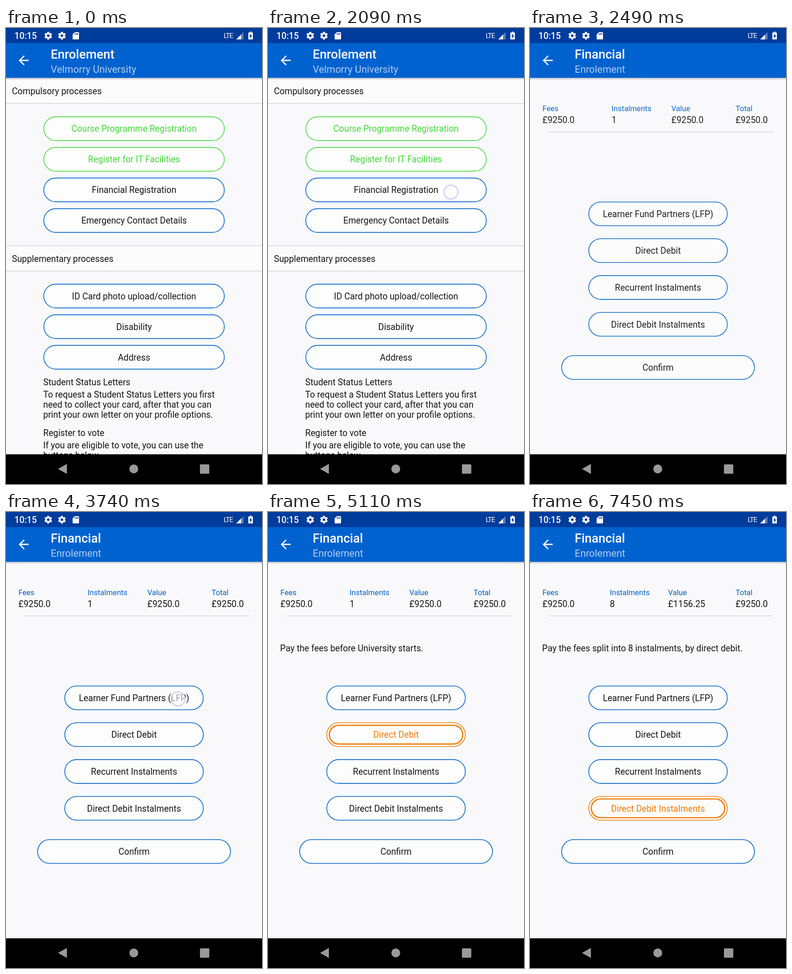
An HTML page that plays this animation: 561x998 px, repeating every 8 s.

```html
<!DOCTYPE html>
<html lang="en">
<head>
<meta charset="utf-8">
<title>Enrolement</title>
<style>
  html, body { margin: 0; height: 100%; overflow: hidden; background: #000; }
  svg { display: block; width: 100%; height: 100%; }
  text { font: 19.3px Roboto, sans-serif; fill: #171717; white-space: pre; }
  .label { font-size: 16.6px; fill: #0060c2; }
  .title { font-size: 27.3px; font-weight: 500; fill: #fff; }
  .subtitle { font-size: 21.8px; fill: #b0cdf0; }
  .clock { font-weight: 500; fill: #fff; }
  .network { font-size: 15px; letter-spacing: -1.2px; fill: #fff; }
</style>
</head>
<body>
<svg viewBox="0 0 561 998">
  <defs>
    <linearGradient id="shade" x2="0" y2="1">
      <stop stop-color="#000" stop-opacity=".24"/>
      <stop offset="1" stop-color="#000" stop-opacity="0"/>
    </linearGradient>
    <clipPath id="page"><rect y="109" width="561" height="824"/></clipPath>
  </defs>
  <rect width="561" height="998" fill="#000"/>
  <rect y="109" width="561" height="824" fill="#f9f9fb"/>
  <g clip-path="url(#page)">
    <g id="processes"></g>
    <g id="finance"></g>
  </g>
  <rect y="109" width="561" height="5" fill="url(#shade)"/>
  <rect width="561" height="33" fill="#003c9c"/>
  <rect y="33" width="561" height="76" fill="#0062cf"/>
  <path transform="translate(22.5 54.6) scale(1.364)" fill="#fff"
        d="M20 11H7.83l5.59-5.59L12 4l-8 8 8 8 1.41-1.41L7.83 13H20z"/>
  <g id="heading"></g>
  <g id="status"></g>
  <g fill="#999">
    <path d="M114 965 133.500 954V976Z"/>
    <circle cx="280" cy="965" r="9.700"/>
    <rect x="425" y="955" width="20.500" height="20.500" rx="2"/>
  </g>
  <circle id="touch" r="15.300" fill="#fff" fill-opacity=".6" stroke="#cbcfec" stroke-width="2.400"/>
</svg>
<script>
const LOOP = 8000, BLUE = '#0062c8', GREEN = '#46d83e', ORANGE = '#f07b05', INK = '#171717';
const byId = id => document.getElementById(id);

const text = (x, y, content, cls = '') => `<text x="${x}" y="${y}" class="${cls}">${content}</text>`;

const pill = (x, cy, width, height, color, stroke, fill) =>
  `<rect x="${x}" y="${cy - height / 2}" width="${width}" height="${height}" rx="${height / 2}"
    fill="${fill}" stroke="${color}" stroke-width="${stroke}"/>`;

const button = (cy, width, label, color = BLUE, selected = false) =>
  pill(280.6 - width / 2, cy, width, 52, color, 1.6, '#fdfdfd') +
  (selected ? pill(286.2 - width / 2, cy, width - 11.2, 41, color, 2.7, 'none') : '') +
  `<text x="280.6" y="${cy + 7}" text-anchor="middle" style="fill:${color === BLUE ? INK : color}">${label}</text>`;

const rule = y => `<rect y="${y}" width="561" height="1.3" fill="#cfcfd2"/>`;

const section = (top, bottom, label) =>
  `<rect y="${top}" width="561" height="${bottom - top}" fill="#fbfbfc"/>` +
  rule(top) + rule(bottom) + text(13, bottom - 19.3, label);

function processesPage() {
  const compulsory = ['Course Programme Registration', 'Register for IT Facilities',
    'Financial Registration', 'Emergency Contact Details'];
  const supplementary = ['ID Card photo upload/collection', 'Disability', 'Address'];
  const notes = [
    [782, 'Student Status Letters'],
    [808.5, 'To request a Student Status Letters you first'],
    [831, 'need to collect your card, after that you can'],
    [853.3, 'print your own letter on your profile options.'],
    [893.3, 'Register to vote'],
    [919.8, 'If you are eligible to vote, you can use the'],
    [942.2, 'buttons below.']
  ];
  return section(108, 164.5, 'Compulsory processes') +
    compulsory.map((label, i) => button(220.4 + 67 * i, 395.6, label, i < 2 ? GREEN : BLUE)).join('') +
    section(476, 531.3, 'Supplementary processes') +
    supplementary.map((label, i) => button(586.6 + 67 * i, 395.6, label)).join('') +
    notes.map(([y, line]) => text(81.5, y, line)).join('');
}

const single = { columns: [27.2, 178.8, 309.8, 450.6], values: ['£9250.0', '1', '£9250.0', '£9250.0'] };
const split = { columns: [27.2, 175, 302.6, 450.6], values: ['£9250.0', '8', '£1156.25', '£9250.0'] };
const funded = { columns: [27.2, 199.5, 351, 482.5], values: ['£9250.0', '0', '£0.0', '£0.0'] };

// One plan per selection; index 0 is "nothing selected".
const plans = [
  { ...single, message: [] },
  { ...funded, message: ['The fees are paid by your student loan.'] },
  { ...single, message: ['Pay the fees before University starts.'] },
  { ...split, message: ['Pay the fees split into 8 instalments, by recurrent payment', 'by card.'] },
  { ...split, message: ['Pay the fees split into 8 instalments, by direct debit.'] }
];
const methods = ['Learner Fund Partners (LFP)', 'Direct Debit', 'Recurrent Instalments', 'Direct Debit Instalments'];

function financePage({ columns, values, message }, selection) {
  const table = ['Fees', 'Instalments', 'Value', 'Total'].map((label, i) =>
    text(columns[i], 182, label, 'label') + text(columns[i], 207.8, values[i])).join('');
  const firstLine = 304.8 - 11.2 * (message.length - 1);
  return table + '<rect x="41" y="226.7" width="492" height="1.4" fill="#d2d2d4"/>' +
    message.map((line, i) => text(26.6, firstLine + 22.4 * i, line)).join('') +
    methods.map((label, i) => {
      const selected = selection === i + 1;
      return button(406.7 + 80.6 * i, 303.6, label, selected ? ORANGE : BLUE, selected);
    }).join('') +
    button(743, 422.6, 'Confirm');
}

const heading = (title, subtitle) => text(98, 67, title, 'title') + text(98, 98.4, subtitle, 'subtitle');

function gear(x) {
  const teeth = [0, 60, 120].map(angle =>
    `<rect x="-2.4" y="-8.4" width="4.800" height="16.800" rx=".8" transform="rotate(${angle})"/>`).join('');
  return `<g transform="translate(${x} 16.800)" fill="#fff">${teeth}<circle r="6.300"/>
    <circle r="2.900" fill="#003c9c"/></g>`;
}

const statusBar = () => text(18.5, 23.8, '10:15', 'clock') + gear(92.6) + gear(122.6) +
  `<path d="M151 9H158.500Q160 9 160 10.500V23.500Q160 25 158.500 25H147.500Q146 25 146 23.500V14Z" fill="#fff"/>
   <path d="M151.500 11v4M154.500 11v4M157.300 11v4" stroke="#003c9c" stroke-width="1.500"/>` +
  text(477, 22, 'LTE', 'network') +
  `<path d="M504.500 25 520.500 9V25Z" fill="#fff" fill-opacity=".35"/>
   <path d="M504.500 25 515 14.500V25Z" fill="#fff"/>
   <path d="M534 8h4v2h3v15h-10V10h3Z" fill="#fff"/>
   <path d="M537 12 533 18.500h2.500V23L539.500 16.500H537Z" fill="#003c9c"/>`;

byId('status').innerHTML = statusBar();
byId('processes').innerHTML = processesPage();
byId('heading').innerHTML =
  `<g>${heading('Enrolement', 'Velmorry University')}</g><g>${heading('Financial', 'Enrolement')}</g>`;
byId('finance').innerHTML = plans.map((plan, i) => `<g>${financePage(plan, i)}</g>`).join('');

const taps = [[2090, 401, 359], [3740, 377, 409], [4840, 377, 490], [6080, 377, 570], [7190, 377, 650]];
const TAP_DELAY = 130;

const ramp = (t, from, to) => Math.min(1, Math.max(0, (t - from) / (to - from)));
const showOnly = (group, index) =>
  [...group.children].forEach((child, i) => child.setAttribute('display', i === index ? 'inline' : 'none'));

function draw(t) {
  const selection = taps.slice(1).filter(([start]) => t >= start + TAP_DELAY).length;
  showOnly(byId('finance'), selection);
  showOnly(byId('heading'), t < 2220 ? 0 : 1);
  byId('processes').setAttribute('opacity', 1 - ramp(t, 2180, 2300));
  byId('finance').setAttribute('opacity', ramp(t, 2320, 2500));

  const tap = taps.findLast(([start]) => t >= start);
  const touch = byId('touch');
  touch.setAttribute('opacity', tap ? 1 - ramp(t, tap[0] + 90, tap[0] + 210) : 0);
  if (tap) touch.setAttribute('transform', `translate(${tap[1]} ${tap[2]})`);
}

const origin = performance.now();
function tick() {
  draw((performance.now() - origin) % LOOP);
  requestAnimationFrame(tick);
}
tick();
</script>
</body>
</html>
```
